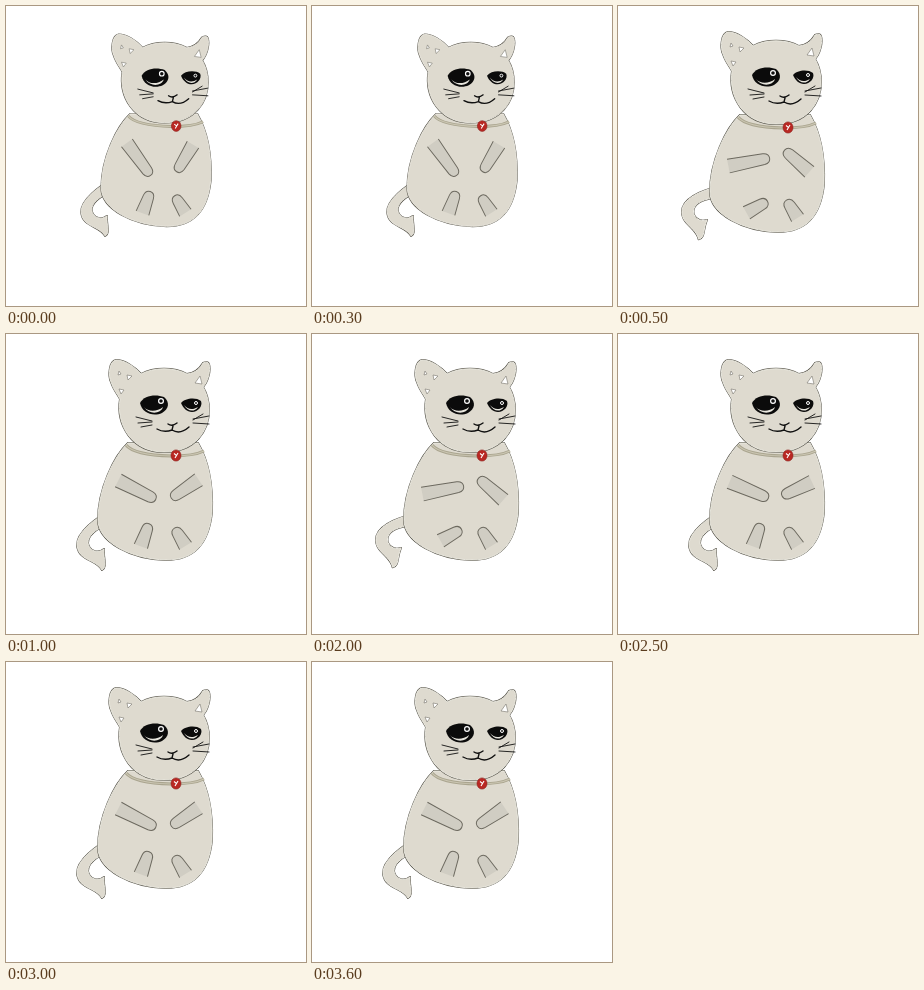
An HTML page for the animation above (4 s loop, 300 by 300 pixels).

```html
<!DOCTYPE html>
<html lang="en">
<head>
<meta charset="utf-8">
<title>Sitting cat</title>
<style>
html, body { margin: 0; width: 100%; height: 100%; overflow: hidden; background: #fff; }
svg { display: block; width: 100vw; height: 100vh; }
.edge { fill: none; stroke: #57544a; stroke-width: 1.9; stroke-linejoin: round; }
.coat { fill: #dedacf; stroke: #eeece4; stroke-width: .9; stroke-linejoin: round; }
.paw { fill: #d0cdc3; stroke: #6c695f; stroke-width: 1; }
.line { fill: none; stroke: #111; stroke-linecap: round; stroke-linejoin: round; }
.ear { fill: #fff; stroke: #77756c; stroke-width: .6; stroke-linejoin: round; }
</style>
</head>
<body>
<svg viewBox="0 0 300 300">
  <defs>
    <path id="tailShape" d="M102 178C90 184 71 198 71 211C72 227 90 225 96 236C102 232 97 226 98 215C92 220 83 217 82 209C82 202 88 196 102 190Z"/>
    <path id="bodyShape" d="M122 109C108 122 92 155 92 186C92 208 125 225 160 226C190 226 203 208 206 178C207 150 203 128 192 109Z"/>
    <path id="headShape" d="M114 65C110 90 125 118 158 118C190 118 203 96 203 76C203 66 200 58 197 53C202 48 205 36 203 30Q202 27 197 29C194 34 190 39 181 40C168 33 148 33 135 40C128 32 118 26 110 26C103 27 102 42 105 48C107 55 112 61 114 65Z"/>
    <path id="band" d="M120 111Q128 121 165 122Q188 122 198 117" fill="none"/>
  </defs>
  <g id="cat">
    <g id="tail"><use href="#tailShape" class="edge"/><use href="#tailShape" class="coat"/></g>
    <use href="#bodyShape" class="edge"/><use href="#bodyShape" class="coat"/>
    <g id="paws"></g>
    <use href="#headShape" class="edge"/><use href="#headShape" class="coat"/>
    <path class="ear" d="M113 37L115 40L112 41ZM121 41L126 42L122 46ZM113 55L118 56L115 60ZM194 42L196 50L189 49Z"/>

    <!-- eyes -->
    <path d="M134 69C138 61 150 60 158 63C164 68 163 75 156 79C147 83 136 79 134 69Z" fill="#0b0b0b"/>
    <path d="M138 73C142 78 151 78 157 73C155 80 143 81 138 73Z" fill="#e8e6de"/>
    <circle cx="155" cy="67" r="2.4" fill="#111" stroke="#fff" stroke-width="1.2"/>
    <path d="M175 69C179 64 190 63 195 67C197 72 192 78 186 78C181 78 177 74 175 69Z" fill="#0b0b0b"/>
    <path d="M178 71C182 76 187 76 192 73C188 79 181 77 178 71Z" fill="#e8e6de"/>
    <circle cx="190" cy="69" r="1.5" fill="#111" stroke="#fff"/>

    <!-- muzzle and whiskers -->
    <path class="line" stroke-width="1.4" d="M151 95Q158 99 166 96Q174 101 183 93M162 90Q166 93 171 89M167 92L166 96"/>
    <path class="line" stroke-width=".9" d="M130 83L146 87M132 89L146 88M135 93L146 91M187 85L203 82M187 86L197 80M187 89L203 90"/>

    <!-- collar -->
    <use href="#band" stroke="#aaa58f" stroke-width="3"/>
    <use href="#band" stroke="#cbc6b3" stroke-width="1.2"/>
    <ellipse cx="170" cy="121.5" rx="5" ry="5.6" fill="#b92823" stroke="#8b211d" stroke-width=".6"/>
    <path d="M168 119.5L170.5 121.5L172 119M170.5 121.5L169 124" fill="none" stroke="#fff" stroke-width="1.1"/>
  </g>
</svg>
<script>
const set = (id, transform) =>
  document.getElementById(id).setAttribute("transform", transform);

// A paw turns about its middle; the far end is open and wider
const paw = (x, y, len, angle) => {
  const end = len / 2;
  return `<path class="paw" transform="translate(${x} ${y}) rotate(${angle})"
    d="M${-end} -7L${end - 6} -5.5Q${end} -5 ${end} 0Q${end} 5 ${end - 6} 5.5L${-end} 7"/>`;
};

// Directions in degrees; the whole cat shrinks a little when it sits upright
const rest = { left: 54, right: 121, foot: -70, tail: 0, size: .96 };
const reach = { left: -11, right: -139, foot: -29, tail: 18, size: 1 };
const lower = { left: 27, right: 146, foot: -70, tail: 0, size: 1 };
const fold = { ...lower, left: 23, right: 155 };
const steps = [rest, reach, lower, lower, reach, fold, lower, lower];

let shown;
function draw(now) {
  const pose = steps[Math.floor(now % 4000 / 500)];
  if (pose !== shown) {
    shown = pose;
    set("cat", `translate(175 85) scale(${pose.size}) translate(-175 -85)`);
    set("tail", `rotate(${pose.tail} 97 186)`);
    document.getElementById("paws").innerHTML =
      paw(131, 156, 42, pose.left) + paw(179, 155, 33, pose.right) +
      paw(139, 201, 24, pose.foot) + paw(174, 203, 21, -122);
  }
  requestAnimationFrame(draw);
}
draw(performance.now());
</script>
</body>
</html>
```
